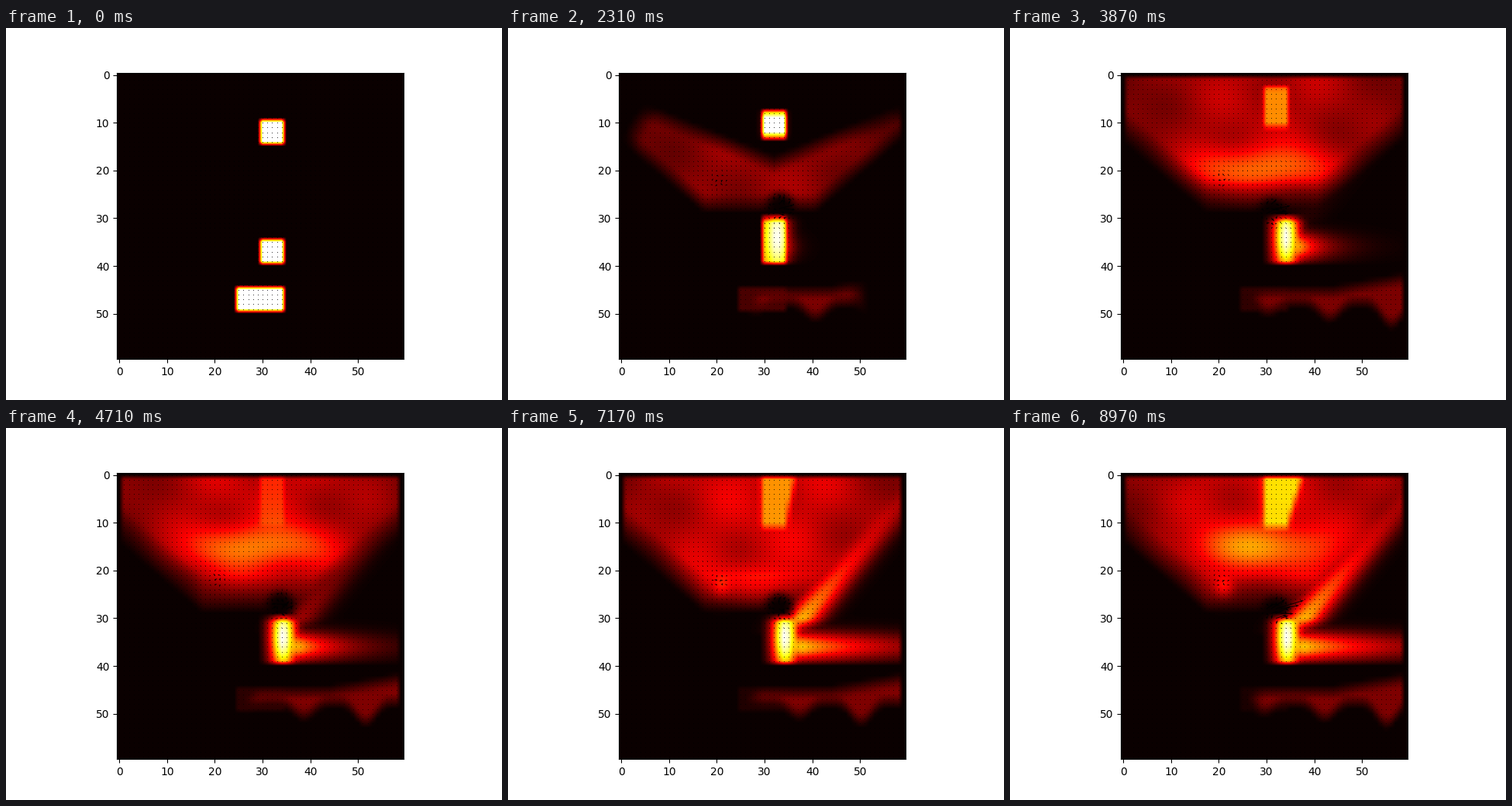
These frames come from a looping animation (640 by 480 pixels, 9 s). A matplotlib script:

```python
import numpy as np
import matplotlib.pyplot as plt
from matplotlib.animation import FuncAnimation

SIZE = 60
FRAMES = 300
INTERVAL = 30
TAU = 2 * np.pi

Y, X = np.mgrid[0:SIZE, 0:SIZE].astype(float)


def ease(n, start, end):
    t = np.clip((n - start) / (end - start), 0, 1)
    return t * t * (3 - 2 * t)


def ramp(v, width):
    return np.clip(v / width, 0, 1)


def bump(d, width):
    return np.exp(-(d / width) ** 2)


def band(v, lo, hi, soft=1):
    """1 between lo and hi, falling to 0 over soft cells outside."""
    return np.clip(np.minimum(v - lo, hi - v) / soft + 1, 0, 1)


def blend(*parts):
    """Smooth maximum."""
    return sum(p ** 4 for p in parts) ** .25


def jet_pos(n):
    c = np.cos(TAU * (n - 195) / 160)
    return 33.5 + 2.8 * c, 27.5 - 1.5 * c


def cloud(n):
    """Fan of hot fluid that spreads from the jet to the upper walls."""
    low = 29 - .84 * np.maximum(0, np.abs(X - 29) - 11.5)
    high = 28 - .0019 * n * n - .4 * np.abs(X - 32)
    front = .45 * n - np.hypot(X - 32, Y - 27)
    shape = (ramp(low - Y, 3 + 5 * ease(n, 40, 160))
             * ramp(Y - high, 4) * ramp(front, 4))

    swirl = (np.sin(.33 * X + .21 * Y + .05 * n)
             + np.sin(.24 * X - .37 * Y - .06 * n))
    level = (.2 + .1 * ease(n, 60, 190)) * (1 + .1 * swirl)
    level *= 1 - .45 * ((X - 30) / 30) ** 2

    # a warm pulse rises through the fan again and again
    age = (n - 70) % 142
    pulse = bump(Y - 29 + .16 * age, 4.5) * np.exp(-((X - 29) / 15) ** 4)
    level += .27 * pulse * np.sin(np.pi * age / 142) * ease(n, 70, 110)
    return shape * level


def arm(n):
    """Hot stream from the jet to the upper right."""
    rise = 31 - Y
    side = .76 * (X - 37 - .85 * rise)
    level = .66 * np.exp(-np.maximum(rise, 0) / 22) * ease(n, 110, 230)
    return level * bump(side, 3.2) * ramp(rise + 3, 4)


def top_source(n):
    flare = 3 * ease(n, 157, 299) * np.clip(1 - Y / 10, 0, 1)
    soft = 1 + ease(n, 60, 200)
    y0 = np.clip(10 - .1 * (n - 60), 0, 10)
    y1 = 14 - 3.5 * ease(n, 55, 105)
    level = 1 - .6 * ease(n, 90, 150) + .28 * ease(n, 157, 299)
    return level * band(X, 30, 34 + flare, soft) * band(Y, y0, y1, soft)


def mid_source(n):
    y0 = 35 - 4.5 * ease(n, 0, 49)
    xc = 32 + 2.3 * ease(n, 40, 150)
    block = band(X, 30, 34) * band(Y, y0, 39)
    core = (bump(X - xc, 2.7) * (1 - .4 * ((Y - 34) / 5.5) ** 2)
            * band(X, 30, SIZE) * band(Y, y0, 39))
    mix = ease(n, 30, 120)

    reach = 1.5 + 17 * ease(n, 80, 240)
    tail = (.72 * np.exp(-np.maximum(X - xc - 2, 0) / reach)
            * bump(Y - 36, 2.9) * ramp(X - xc, 3) * band(Y, 0, 39))
    return blend(block * (1 - mix) + np.maximum(core, 0) * mix, tail * mix)


def low_source(n):
    """Block that is washed out into a wavy ribbon."""
    block = band(X, 25, 34) * band(Y, 45, 49) / (1 + n / 8)
    wave = .5 + .5 * np.cos(TAU * (X - 35 - .3 * (n - 102)) / 13)
    bottom = 49 + (1.5 + (X - 26) / 10) * wave ** 2
    top = 44 - 2.5 * ramp(X - 44, 14)
    ribbon = (ramp(X - 25.5, 4) * ramp(33 + .24 * n - X, 4)
              * ramp(Y - top, 3) * ramp(bottom - Y, 3))
    return blend(block, .17 * ease(n, 0, 40) * ribbon)


def density(n):
    lobe = .38 * ease(n, 150, 240) * bump(np.hypot(X - 21, Y - 23), 3)
    d = blend(cloud(n), arm(n), lobe, top_source(n))
    cx, cy = jet_pos(n)
    hole = np.exp(-(np.hypot(X - cx, Y - cy) / 3) ** 4)
    d *= 1 - hole * ease(n, 5, 40)
    d = blend(d, mid_source(n), low_source(n))
    d[[0, -1]] = 0
    d[:, [0, -1]] = 0
    return d / d.max()


rng = np.random.default_rng(4)
AY, AX = np.mgrid[18:33, 16:43]
PHASE = rng.uniform(0, TAU, AX.shape)
GAIN = rng.uniform(.3, 1.1, AX.shape)


def velocity(n):
    """Flapping jet plus a small swirl on the left."""
    cx, cy = jet_pos(n)
    flap = np.cos(TAU * (n - 299) / 79)
    start = ease(n, 0, 20)
    r = np.hypot(AX - cx, AY - cy)
    push = GAIN * bump(r, 1.4) * start
    eddy = .18 * bump(r, 3) + .1 * bump(np.hypot(AX - 20.5, AY - 22), 2.5)
    turn = PHASE + .2 * n
    u = 1.2 * flap * push + start * eddy * np.cos(turn)
    v = -.4 * abs(flap) * push + start * eddy * np.sin(turn)
    return u, v


fig, ax = plt.subplots(figsize=(6.4, 4.8), dpi=100)
im = ax.imshow(density(0), cmap='hot', vmin=0, vmax=1,
               interpolation='bilinear')
ax.scatter(X.ravel(), Y.ravel(), s=.41, c='black', marker='H', linewidths=0)
arrows = ax.quiver(AX, AY, *velocity(0), scale=10, angles='xy', width=.0024)
ax.set(xlim=(-.5, SIZE - .5), ylim=(SIZE - .5, -.5))


def update(n):
    im.set_data(density(n))
    arrows.set_UVC(*velocity(n))
    return im, arrows


anim = FuncAnimation(fig, update, frames=FRAMES, interval=INTERVAL,
                     repeat=True, repeat_delay=0, cache_frame_data=False)
plt.show()
```
